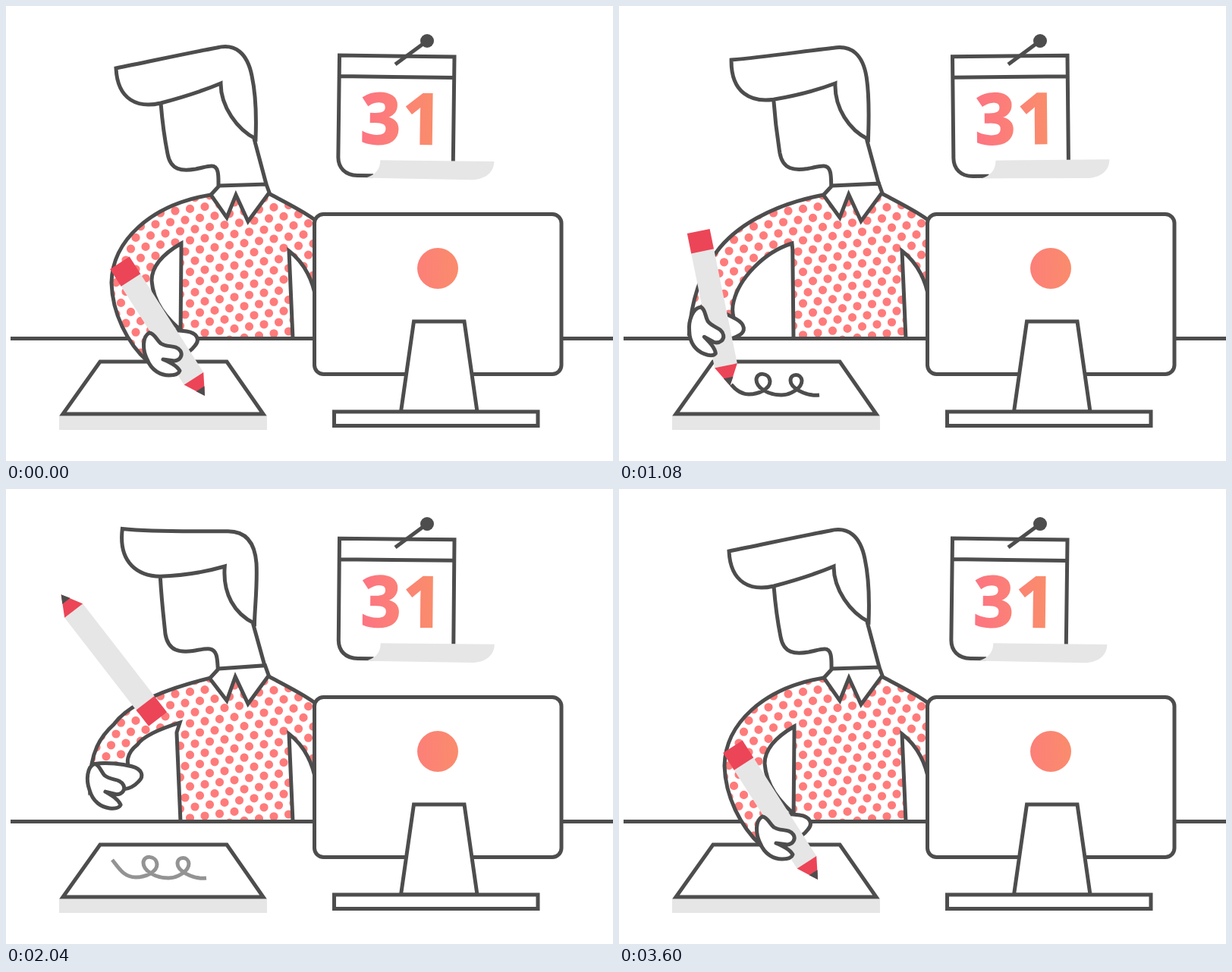
An HTML page that plays this animation: 800 px wide and 600 px high, repeating every 3640 ms.

```html
<!DOCTYPE html>
<html lang="en">
<head>
<meta charset="utf-8">
<title>At the desk</title>
<style>
  html, body { margin: 0; width: 100%; height: 100%; overflow: hidden; background: #fff; }
  svg { display: block; }
  .line { fill: none; stroke: #4d4d4d; stroke-width: 5; }
  .solid { fill: #fff; }
  .round { stroke-linejoin: round; }
  .red { fill: #ec4557; }
  .grey { fill: #e6e6e6; }
  .dark { fill: #4d4d4d; }
  text { font: 700 92px "Open Sans", sans-serif; fill: url(#warm); stroke: url(#warm); stroke-width: 2.5; }
</style>
</head>
<body>
<svg width="800" height="600" viewBox="0 0 800 600">
  <defs>
    <linearGradient id="warm" gradientUnits="userSpaceOnUse" x1="470" x2="562" y1="0" y2="0">
      <stop stop-color="#fd7482"/><stop offset="1" stop-color="#fa8c6c"/>
    </linearGradient>
    <linearGradient id="glow">
      <stop stop-color="#fc7f78"/><stop offset="1" stop-color="#fa8c6c"/>
    </linearGradient>
    <path id="shirt"/>
    <clipPath id="inShirt"><use href="#shirt"/></clipPath>
  </defs>

  <path class="line" d="M6 438.5H800"/>
  <path class="grey" d="M70 541H344V559H70Z"/>
  <path class="line solid" d="M124 469H291L339 538H75Z"/>
  <path class="line" id="ink" d="M264 513C245 515 226 503 226 494C226 484 240 484 241 494C241 504 226 513 214 513C196 513 181 503 181 493C181 482 198 483 199 495C199 505 184 512 171 512C155 512 148 499 140 489"/>

  <use href="#shirt" fill="#fff"/>
  <g clip-path="url(#inShirt)">
    <path id="dots" fill="none" stroke="#ff7b7b" stroke-width="11.2" stroke-linecap="round"/>
  </g>
  <use href="#shirt" class="line"/>
  <path class="line" id="head"/>
  <path class="line solid" id="collar"/>

  <path class="line solid round" id="palm" d="M189 432C205 428 225 428 238 430C252 432 256 441 249 449C243 457 236 460 231 461L205 450Z"/>
  <g id="pen">
    <g transform="translate(262 515) rotate(57.4)">
      <path class="grey" d="M-182-15.2H-27V15.2H-182Z"/>
      <path class="red" d="M-208-15.2H-181V15.2H-208ZM-27-15.2L0 0L-27 15.2Z"/>
      <path class="dark" d="M-11-6.5L0 0L-11 6.5Z"/>
    </g>
  </g>
  <path class="line solid round" id="fingers" d="M189 432C179 437 180 455 186 467C192 482 204 488 215 488C224 488 228 485 229 482C225 475 216 471 207 467L222 469C230 468 233 461 230 456C224 447 213 452 204 446C198 441 196 433 189 432Z"/>

  <rect class="line solid" x="406.5" y="274.5" width="325.5" height="211" rx="12"/>
  <circle cx="569" cy="346" r="27" fill="url(#glow)"/>
  <path class="line solid" d="M520.5 535L537.5 416H604L621 535Z"/>
  <path class="line solid" d="M432.5 535H701V553.5H432.5Z"/>

  <g id="calendar">
    <path class="line" d="M486 224H465C449 224 439.5 214 439.5 200V66H591V204M439.5 93.5H591"/>
    <path class="grey" d="M495 203.5C495 217 487 224 476 227L617 228C634 227 645 218 645 203.5Z"/>
    <text x="468.5 524" y="181.5">31</text>
  </g>
  <path class="line" d="M513 77L555 46"/>
  <circle class="dark" cx="555" cy="46" r="9"/>
</svg>

<script>
const LOOP = 3640, WRITE_START = 50, WRITE_END = 1140, THROW = 1780, CATCH = 2902;
const el = id => document.getElementById(id);
const [shirt, dots, head, collar, ink, palm, pen, fingers, calendar] =
  ['shirt', 'dots', 'head', 'collar', 'ink', 'palm', 'pen', 'fingers', 'calendar'].map(el);
const clamp = v => Math.min(1, Math.max(0, v));
const nums = s => s.split(' ').map(Number);
const inkLength = ink.getTotalLength();

// Head and collar, bowed and raised
const headLow = 'M204 128C207 165 211 185 213 195C217 217 232 218 250 215C260 213 265 211 271 211C281 211 280 225 280 237M327 175L343 235M145 82C190 73 235 63 278 55C302 49 318 62 324 92C330 120 330 150 329 175C305 163 283 133 283 102C255 114 230 121 204 128C175 135 147 125 145 82Z';
const headHigh = 'M203 111C205 150 208 175 209 190C213 214 230 215 245 213C258 211 262 210 268 211C278 213 278 225 279 237M325 178L341 235M156 43C200 52 250 53 295 56C318 57 331 70 332 100C332 130 327 160 327 178C300 165 286 140 290 102C265 108 235 112 203 111C175 108 148 90 156 43Z';
const collarLow = 'M270 249L281 237L343 235L347 246L319 284L303 249L291 279Z';
const collarHigh = 'M268 250L280 237L341 232L346 246L319 283L302 247L291 279Z';

// Arm: outer curve down to the wrist, then inner curve up to the armpit
const rest = nums('190 262 140 310 139 365 140 405 160 445 210 412 194 390 192 362 192 345 205 328 231 313');
const reach = nums('180 265 122 310 114 375 111 395 112 415 163 415 163 405 164 385 165 360 190 328 228 313');
const finish = nums('200 262 152 292 128 325 108 350 95 390 149 404 149 398 151 390 158 360 190 325 228 313');
const raise = nums('240 261 185 258 150 276 125 289 96 316 144 350 150 334 168 322 182 313 208 311 228 307');
const ready = nums('185 262 131 315 130 365 130 390 138 410 188 392 180 378 180 362 180 345 200 325 231 311');

const armKeys = [[0, ...rest], [600, ...reach], [1080, ...finish], [THROW, ...raise], [2400, ...ready], [2800, ...rest]];
const liftKeys = [[0, 0], [600, .1], [1080, .28], [THROW, 1], [2400, .23], [2800, 0]];
const tiltKeys = [[0, 0], [600, -3], [720, -6], [1080, 21], [WRITE_END, 24], [THROW, -2.2], [2400, 20], [2800, 0]];
const handKeys = [[WRITE_END, 138, 490], [THROW, 168, 438], [2400, 202, 489], [2800, 262, 515]];

// Monotone cubic interpolation of [time, ...values] keys
function track(keys, t) {
  const last = keys.length - 1;
  let i = 0;
  while (i < last - 1 && keys[i + 1][0] <= t) i++;
  const a = keys[i], b = keys[i + 1], span = b[0] - a[0], u = clamp((t - a[0]) / span);
  const rate = (j, c) => (keys[j + 1][c] - keys[j][c]) / (keys[j + 1][0] - keys[j][0]);
  const slope = (j, c) => {
    if (j === 0 || j === last) return 0;
    const p = rate(j - 1, c), q = rate(j, c);
    return p * q > 0 ? 2 * p * q / (p + q) : 0;
  };
  return a.slice(1).map((v, n) => {
    const s = u * u * (3 - 2 * u), c = n + 1;
    return v + (b[c] - v) * s + span * u * (1 - u) * (slope(i, c) * (1 - u) - slope(i + 1, c) * u);
  });
}

function mix(from, to, k) {
  const ends = to.match(/\d+/g);
  let i = 0;
  return from.replace(/\d+/g, v => +v + (ends[i++] - v) * k);
}

const place = (node, x, y, angle, px, py) =>
  node.setAttribute('transform', `translate(${x} ${y}) rotate(${angle}) translate(${-px} ${-py})`);

const writtenAt = t => clamp((t - WRITE_START) / (WRITE_END - WRITE_START));

function handAt(t) {
  const [tilt] = track(tiltKeys, t);
  if (t >= WRITE_END) return [...track(handKeys, t), tilt];
  const p = ink.getPointAtLength(inkLength * writtenAt(t));
  return [p.x - 2, p.y + 1, tilt];
}

function drawShirt(t, lift, [x, y, tilt]) {
  const arm = track(armKeys, t), r = tilt * Math.PI / 180, cos = Math.cos(r), sin = Math.sin(r);
  const wrist = (dx, dy) => [x + dx * cos - dy * sin, y + dx * sin + dy * cos];
  shirt.setAttribute('d', `M425 296C400 274 370 260 346 247L270 249
    C${arm.slice(0, 6)}C${arm.slice(6, 10)},${wrist(-75, -45)}L${wrist(-24, -80)}
    C${arm.slice(10, 16)}C${arm.slice(16)}L${231 - 8 * lift} 321L230 438.5H378L373 323
    C395 340 405 365 408 385L425 385Z`);
}

function drawPen(t, hand) {
  const flying = t > THROW && t < CATCH;
  if (!flying) {
    pen.before(palm);
    place(pen, ...hand, 262, 515);
    return;
  }
  pen.after(palm);
  const left = 1 - clamp((t - THROW) / 1020);
  const x = 206 - 97 * left ** 1.12;
  const y = 180 + 173 * ((t - 2290) / 510) ** 2;
  place(pen, x, y, 360 - 362.2 * left ** 2.27, 206, 427.5);
}

function draw(now) {
  const t = now % LOOP;
  const [lift] = track(liftKeys, t);
  const hand = handAt(t);
  head.setAttribute('d', mix(headLow, headHigh, lift));
  collar.setAttribute('d', mix(collarLow, collarHigh, lift));
  drawShirt(t, lift, hand);
  drawPen(t, hand);
  place(palm, ...hand, 262, 515);
  place(fingers, ...hand, 262, 515);

  const written = writtenAt(t);
  ink.style.strokeDasharray = `${written * inkLength} 999`;
  ink.style.opacity = written ? 1 - clamp((t - THROW) / 660) : 0;

  const swing = .7 * Math.cos(4 * Math.PI * t / LOOP);
  calendar.setAttribute('transform', `rotate(${swing} 515 66)`);
  requestAnimationFrame(draw);
}

let spots = '';
for (let u = -30; u < 30; u++)
  for (let v = -30; v < 30; v++) {
    const x = 249 + 13 * u - 6.5 * v, y = 419 + 12 * u + 14.8 * v;
    if (x > 80 && x < 430 && y > 235 && y < 480) spots += `M${x} ${y}h0`;
  }
dots.setAttribute('d', spots);
requestAnimationFrame(draw);
</script>
</body>
</html>
```
